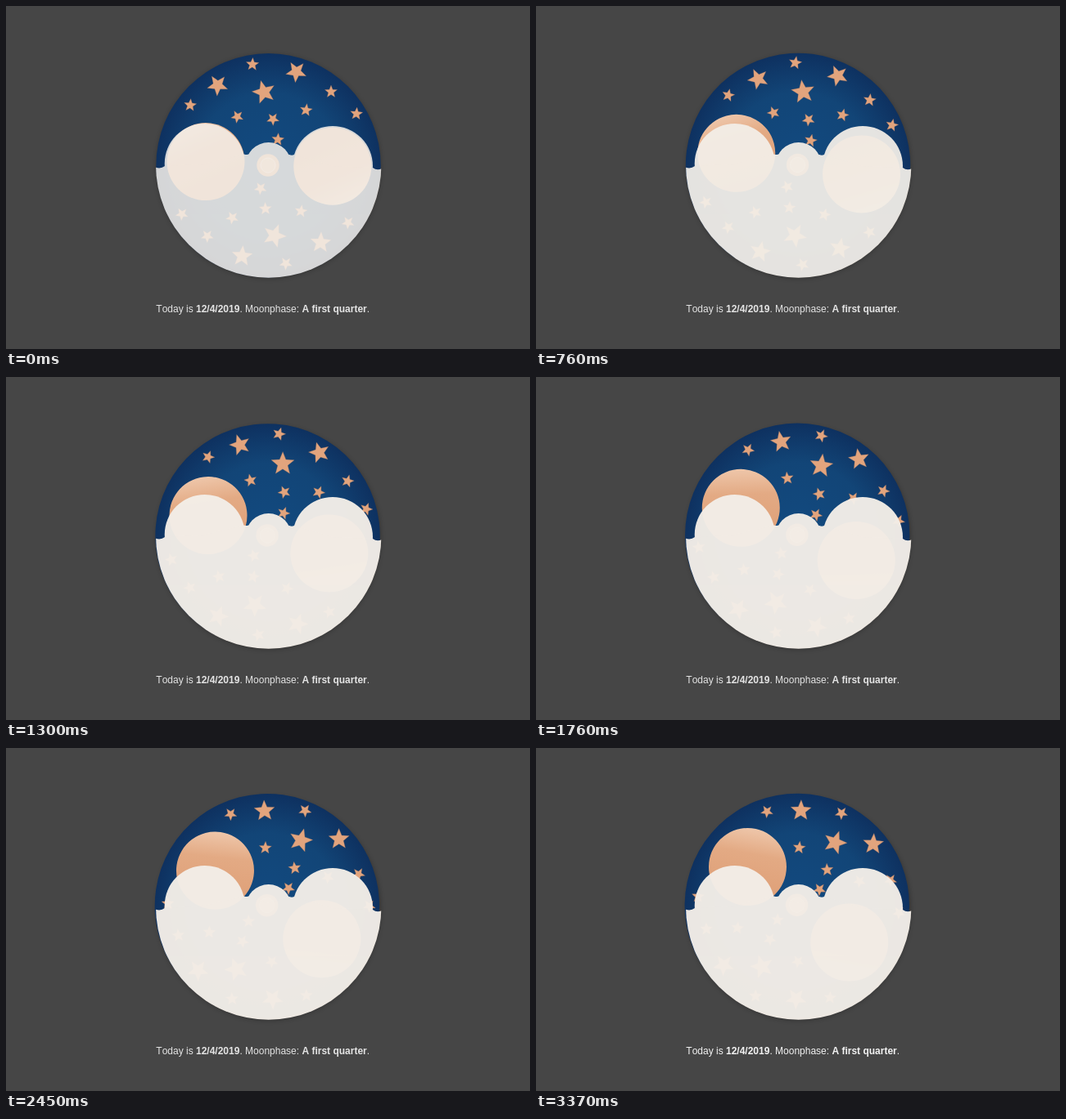
Recreate the animation shown at these times as an HTML page. Size 640 by 420 pixels, loop 4780 ms.

```html
<!DOCTYPE html>
<html lang="en">
<head>
<meta charset="utf-8">
<title>Moon phase</title>
<style>
  html, body { margin: 0; width: 100%; height: 100%; overflow: hidden; background: #464646; }
  svg { display: block; }
  text { font: 12px Arial, "Liberation Sans", sans-serif; font-kerning: none; }
  tspan { font-weight: bold; }
</style>
</head>
<body>
<svg width="640" height="420" viewBox="0 0 640 420">
  <defs>
    <radialGradient id="sky">
      <stop offset="0" stop-color="#124a80"/>
      <stop offset=".65" stop-color="#124577"/>
      <stop offset="1" stop-color="#0e3160"/>
    </radialGradient>
    <linearGradient id="moon" x1=".25" y1="0" x2=".7" y2="1">
      <stop offset="0" stop-color="#f0cbb0"/>
      <stop offset=".35" stop-color="#e3aa84"/>
      <stop offset="1" stop-color="#dd9c73"/>
    </linearGradient>
    <filter id="soft"><feGaussianBlur stdDeviation="3"/></filter>
    <clipPath id="round"><circle cx="320.7" cy="195" r="137.7"/></clipPath>
  </defs>

  <circle cx="320.7" cy="196.5" r="136.5" opacity=".3" filter="url(#soft)"/>

  <g id="disc">
    <circle cx="320.5" cy="195.3" r="137.2" fill="url(#sky)"/>
    <g id="half">
      <circle cx="244" cy="190.6" r="47.5" fill="url(#moon)"/>
      <g id="stars" fill="#e2a47d" stroke="#8a6a60" stroke-opacity=".5" stroke-width=".6"></g>
    </g>
    <use href="#half" transform="rotate(180 321.4 193.4)"/>
    <circle cx="320" cy="195" r="13.7" fill="#dd9c73"/>
    <circle cx="320" cy="195" r="9" fill="#e8b592" stroke="#f3d9c6"/>
  </g>

  <g id="cloud" fill="#f3eee8" clip-path="url(#round)">
    <circle cx="242.7" cy="193" r="49"/>
    <circle cx="320.7" cy="195" r="28"/>
    <circle cx="399" cy="196" r="49"/>
    <path d="M182 197.5Q189 200 194 196L243 193 291 181.5q2 1 5 0L320 190 346 182q3 1.5 6 0L399 196 448 198q5 4 11 1V340H182Z"/>
  </g>

  <text id="label" x="183.3" y="375">Today is <tspan>12/4/2019</tspan>. Moonphase: <tspan>A first quarter</tspan>.</text>
</svg>
<script>
const LOOP = 4780, STEP = 76.6, END = 3370;
const $ = id => document.getElementById(id);

// x, y, radius, tilt in degrees
const stars = [
  [315, 105.5, 14.8, -15], [354.5, 80.5, 13.2, -31], [258.5, 97, 13.2, -33],
  [301, 71.5, 8.2, 3], [225, 121.5, 8, 5], [397, 105, 8, 0], [428, 132, 8, 5],
  [282.5, 135.5, 8, -28], [366.5, 127.5, 8, 8], [326, 138.5, 8, 34], [332, 163.5, 8, 5]
];

function starPath([x, y, r, tilt]) {
  const points = Array.from({ length: 10 }, (_, i) => {
    const a = (tilt + i * 36 - 90) * Math.PI / 180;
    const d = i % 2 ? r * 0.44 : r;
    return `${x + d * Math.cos(a)},${y + d * Math.sin(a)}`;
  });
  return `<polygon points="${points.join(" ")}"/>`;
}
$("stars").innerHTML = stars.map(starPath).join("");

// cubic-bezier(.42, 0, .58, 1)
function easeInOut(x) {
  let lo = 0, hi = 1;
  for (let i = 0; i < 20; i++) {
    const s = (lo + hi) / 2, q = 1 - s;
    if (1.26 * q * q * s + 1.74 * q * s * s + s ** 3 < x) lo = s; else hi = s;
  }
  return lo * lo * (3 - 2 * lo);
}

// the turn is already under way when the loop begins
const turn = t => easeInOut((t + 630) / (END + 630));

function draw(now) {
  const t = Math.min(Math.floor((now % LOOP + 8) / STEP) * STEP, END);
  const angle = 34.6 * (turn(t) - turn(0)) / (1 - turn(0));
  const haze = Math.max(0, 1 - t / 1400) ** 1.5;
  $("disc").setAttribute("transform", `rotate(${angle} 323.6 191.3)`);
  $("cloud").setAttribute("opacity", 0.97 - 0.096 * haze);
  $("label").setAttribute("fill", t < END ? "#e4e4e4" : "#f2f2f2");
}

const start = performance.now();
function tick() {
  draw(performance.now() - start);
  requestAnimationFrame(tick);
}
tick();
</script>
</body>
</html>
```
